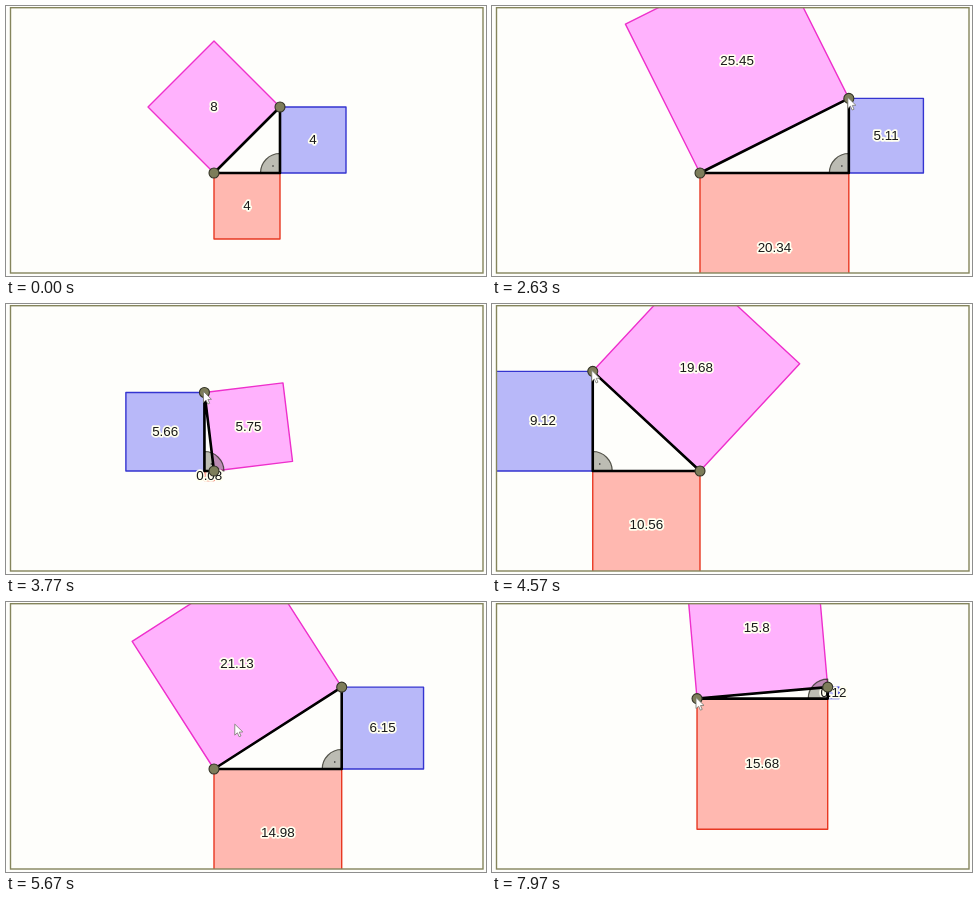
These frames come from a looping animation (480 by 270 pixels, 8000 ms). An HTML page with a canvas:

```html
<!DOCTYPE html>
<html lang="en">
<head>
<meta charset="utf-8">
<title>Squares on a right triangle</title>
<style>
  html, body { margin: 0; width: 100%; height: 100%; overflow: hidden; background: #fefefb; }
  canvas { display: block; width: 480px; height: 270px; }
</style>
</head>
<body>
<canvas id="stage" width="480" height="270"></canvas>
<script>
const ctx = document.getElementById('stage').getContext('2d');
const LOOP = 8000, UNIT = 33, ORIGIN = { x: 208, y: 167 };
const ENTER = 1730, GRAB_B = 1980, DROP_B = 5430, GRAB_A = 5880;

const key = (time, x, y) => ({ time, x, y });

// Turning points of each drag, in grid units with y pointing up.
const startB = key(GRAB_B, 2, 2), endB = key(DROP_B, 3.87, 2.48), startA = key(GRAB_A, 0, 0);
const pathB = [startB, key(2630, 4.51, 2.26), key(3770, -.29, 2.38), key(4570, -3.25, 3.02), endB];
const pathA = [startA, key(6830, .57, .84), key(7400, -.05, .8), key(7970, -.09, 2.134)];
const pathEnter = [key(ENTER, 2.8, -3.1), startB];
const pathCross = [endB, key(5670, .66, 1.33), startA];

// Smooth cubic through the keys, at rest on both ends.
function along(keys, t) {
  const last = keys.length - 1;
  if (t <= keys[0].time) return keys[0];
  if (t >= keys[last].time) return keys[last];
  const i = keys.findIndex(k => k.time > t) - 1;
  const p = keys[i], q = keys[i + 1], span = q.time - p.time;
  const u = (t - p.time) / span, v = 1 - u;
  const slope = (j, axis) => {
    if (j === 0 || j === last) return 0;
    const before = keys[j - 1], after = keys[j + 1];
    return (after[axis] - before[axis]) / (after.time - before.time) * span;
  };
  const at = axis =>
    p[axis] * (1 + 2 * u) * v * v + slope(i, axis) * u * v * v +
    q[axis] * (1 + 2 * v) * u * u - slope(i + 1, axis) * u * u * v;
  return { x: at('x'), y: at('y') };
}

const toStage = p => ({ x: ORIGIN.x + p.x * UNIT, y: ORIGIN.y - p.y * UNIT });

function paint(fill, stroke, width, path) {
  ctx.fillStyle = fill;
  ctx.strokeStyle = stroke;
  ctx.lineWidth = width;
  ctx.fill(path);
  ctx.stroke(path);
}

function polygon(...points) {
  const path = new Path2D();
  points.forEach(p => path.lineTo(p.x, p.y));
  path.closePath();
  return path;
}

// Square on the side pq, facing away from the opposite corner; returns its label.
function drawSquare(p, q, opposite, fill, stroke) {
  let nx = q.y - p.y, ny = p.x - q.x;
  if (nx * (opposite.x - p.x) + ny * (opposite.y - p.y) > 0) { nx = -nx; ny = -ny; }
  const shift = s => ({ x: s.x + nx, y: s.y + ny });
  paint(fill, stroke, 1.4, polygon(p, q, shift(q), shift(p)));
  const area = (nx * nx + ny * ny) / UNIT ** 2;
  return { x: (p.x + q.x + nx) / 2, y: (p.y + q.y + ny) / 2, text: String(+area.toFixed(2)) };
}

function drawRightAngle(a, b, c) {
  const sx = Math.sign(a.x - c.x) || 1, sy = Math.sign(b.y - c.y) || -1;
  const wedge = new Path2D();
  wedge.moveTo(c.x, c.y);
  wedge.arc(c.x, c.y, 19.5, sx > 0 ? 0 : Math.PI, sy * Math.PI / 2, sx * sy < 0);
  wedge.closePath();
  paint('rgba(60,60,40,.34)', 'rgba(50,50,40,.8)', 1.2, wedge);
  ctx.fillStyle = '#333';
  ctx.fillRect(c.x + sx * 7 - .7, c.y + sy * 7 - .7, 1.4, 1.4);
}

function drawLabel({ x, y, text }) {
  ctx.strokeStyle = '#fffff0';
  ctx.lineWidth = 3.5;
  ctx.strokeText(text, x, y + 4.2);
  ctx.fillStyle = '#181818';
  ctx.fillText(text, x, y + 4.2);
}

function drawPoint({ x, y }) {
  const dot = new Path2D();
  dot.arc(x, y, 5, 0, 2 * Math.PI);
  paint('#7d7d5a', '#333326', 1.1, dot);
}

const arrow = new Path2D('M0 0v11l2.6-2.3 1.8 3.9 1.8-.8-1.7-3.8 3.5-.2z');

function drawCursor({ x, y }) {
  ctx.save();
  ctx.translate(x - 1, y - 1);
  paint('#fff', '#77776c', .8, arrow);
  ctx.restore();
}

function cursorAt(t) {
  if (t < GRAB_B) return along(pathEnter, t);
  if (t < DROP_B) return along(pathB, t);
  if (t < GRAB_A) return along(pathCross, t);
  return along(pathA, t);
}

function draw(t) {
  const a = toStage(along(pathA, t)), b = toStage(along(pathB, t));
  const c = { x: b.x, y: a.y };

  ctx.fillStyle = '#fefefb';
  ctx.fillRect(0, 0, 480, 270);
  ctx.save();
  ctx.beginPath();
  ctx.rect(4, 1.5, 473, 265.5);
  ctx.clip();
  ctx.lineJoin = 'round';
  ctx.textAlign = 'center';
  ctx.font = '13.4px "Liberation Sans", Arial, sans-serif';

  const labels = [
    drawSquare(a, c, b, 'rgba(255,20,0,.3)', '#e83822'),
    drawSquare(b, c, a, 'rgba(20,20,240,.3)', '#3434d0'),
    drawSquare(a, b, c, 'rgba(255,0,255,.3)', '#ee30cc')
  ];
  drawRightAngle(a, b, c);
  labels.forEach(drawLabel);

  ctx.strokeStyle = '#000';
  ctx.lineWidth = 2.6;
  ctx.stroke(polygon(a, b, c));
  drawPoint(a);
  drawPoint(b);
  if (t >= ENTER) drawCursor(toStage(cursorAt(t)));
  ctx.restore();

  ctx.strokeStyle = '#85855c';
  ctx.lineWidth = 1.4;
  ctx.strokeRect(4.5, 1.7, 472.5, 265.3);
}

// Thirty steps a second, each starting on a whole hundredth.
function stepTime(t) {
  const step = Math.floor((t + 5) * 30 / 1000);
  return Math.round(step * 100 / 30) * 10;
}

function tick() {
  draw(stepTime(performance.now() % LOOP));
  requestAnimationFrame(tick);
}
tick();
</script>
</body>
</html>
```
